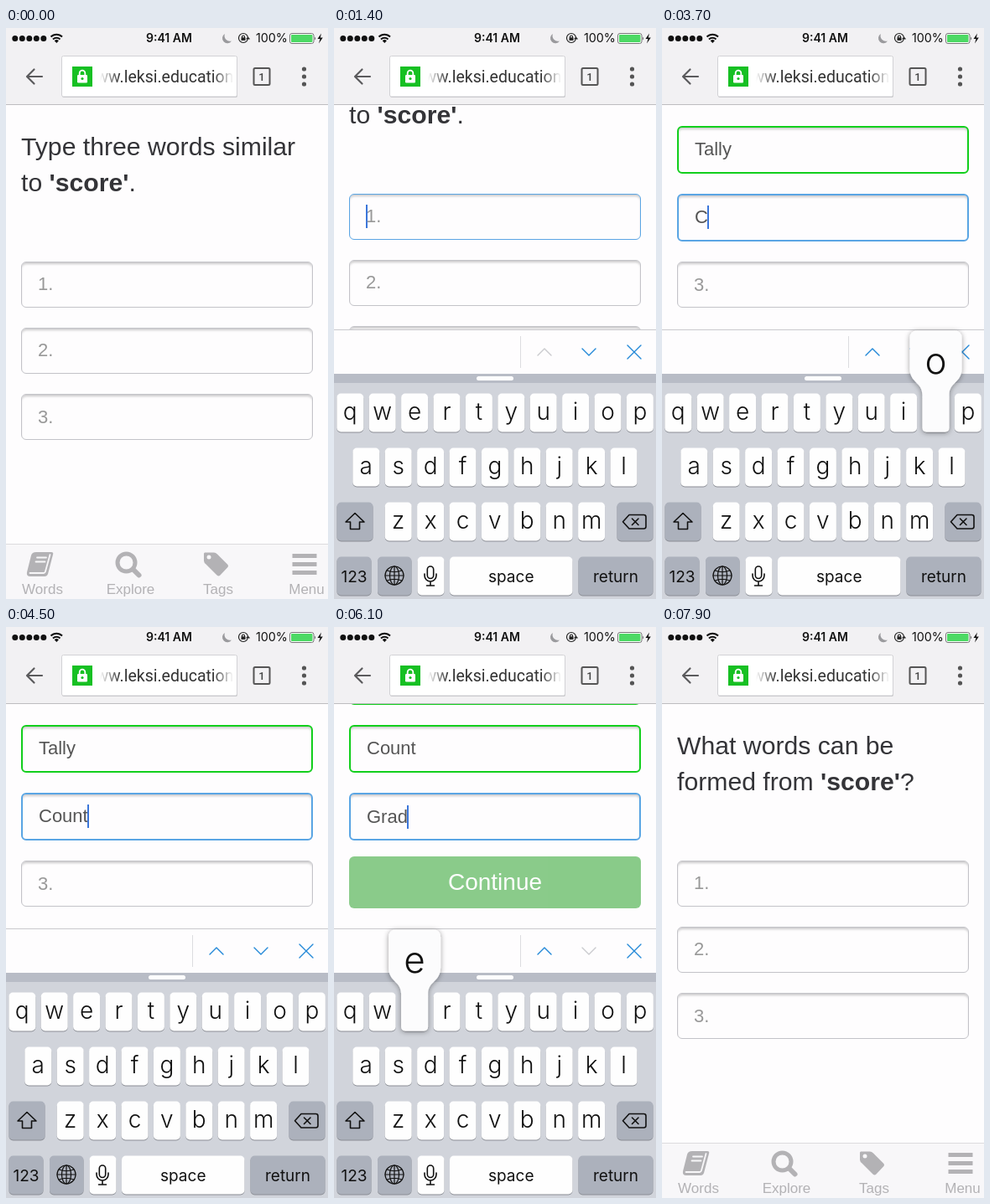
Write an HTML page that moves like this. It is 384 by 682 pixels and loops after 8 s.

```html
<!DOCTYPE html>
<html lang="en">
<head>
<meta charset="utf-8">
<title>Word quiz on a phone</title>
<style>
  html, body { margin: 0; width: 100%; height: 100%; overflow: hidden; background: #fefdfe; }
  body { position: relative; font-family: "Liberation Sans", Arial, sans-serif; }
  #page { position: absolute; left: 0; top: 0; width: 384px; }
  h1 { position: absolute; left: 18px; top: 120px; margin: 0; font: 400 30.2px/43px "Liberation Sans", Arial, sans-serif; color: #343438; white-space: nowrap; }
  #form { position: absolute; left: 18px; top: 278.6px; width: 348px; }
  .field { display: flex; align-items: center; box-sizing: content-box; height: 53px; margin-bottom: 24.4px;
    padding-left: 19px; border: 1px solid #c3c3c8; border-radius: 6px; font-size: 22px; color: #555;
    box-shadow: inset 0 3px 3px -1px rgba(0, 0, 0, .2); }
  .filled { border: 2px solid #12cf1c; }
  .focus { border-color: #5aa5e4; }
  .field i { width: 2px; height: 28px; margin-right: -2px; background: #3b76da; visibility: hidden; }
  .filled i { margin-left: -1px; }
  .focus i { visibility: visible; }
  .field em { font-style: normal; color: #999; }
  .filled em { display: none; }
  #go { margin-top: -5.5px; height: 62px; border-radius: 6px; background: #5cb85c; color: #fff; font-size: 28px; line-height: 62px; text-align: center; }
  svg { position: absolute; left: 0; top: 0; }
  .key { font: 300 28px Inter, sans-serif; }
  .ui { font: 400 19px Inter, sans-serif; }
  .status { font: 600 14px Inter, sans-serif; }
  .tab { font: 17px "Liberation Sans", Arial, sans-serif; fill: #b3b2b5; }
  .mid, .key, .ui, .tab { text-anchor: middle; }
  .line { fill: none; stroke-linecap: round; stroke-linejoin: round; }
</style>
</head>
<body>
<div id="page">
  <h1>Type three words similar<br>to <b>'score'</b>.</h1>
  <h1>What words can be<br>formed from <b>'score'</b>?</h1>
  <div id="form">
    <div class="field"><span></span><i></i><em>1.</em></div>
    <div class="field"><span></span><i></i><em>2.</em></div>
    <div class="field"><span></span><i></i><em>3.</em></div>
    <div id="go">Continue</div>
  </div>
</div>

<svg width="384" height="682" viewBox="0 0 384 682">
  <defs>
    <linearGradient id="fade"><stop stop-color="#fff"/><stop offset="1" stop-color="#fff" stop-opacity="0"/></linearGradient>
    <filter id="shade" x="-30%" y="-20%" width="160%" height="140%"><feDropShadow dx="0" dy="1" stdDeviation="3" flood-opacity=".4"/></filter>
  </defs>

  <!-- status bar and browser bar -->
  <rect width="384" height="92" fill="#f2f1f3"/>
  <path d="M0 91.5H384" stroke="#bdbdc0"/>
  <path d="M10.8 12.5H45" stroke="#111" stroke-width="7" stroke-linecap="round" stroke-dasharray="0 8.5"/>
  <path d="M53.5 10.5a9.5 9.5 0 0 1 13.5 0M56 13.5a6 6 0 0 1 8.5 0" fill="none" stroke="#111" stroke-width="2"/>
  <path d="M60.3 18l-2.6-2.8a3.8 3.8 0 0 1 5.2 0z" fill="#111"/>
  <text class="status mid" x="194.5" y="17" fill="#111">9:41 AM</text>
  <path d="M261 7a6 6 0 1 0 8 8.5a6.5 6.5 0 0 1-8-8.5z" fill="#9a9a9d"/>
  <g class="line" stroke="#222" stroke-width="1.2"><circle cx="283" cy="12" r="5.5"/><path d="M281.5 11.5v-1a1.5 1.5 0 0 1 3 0v1M287 13l1.6-1.5 1.5 1.5"/></g>
  <rect x="280.5" y="11.3" width="5" height="3.6" fill="#222"/>
  <text x="298" y="17" style="font:400 14.3px Inter,sans-serif" fill="#111">100%</text>
  <rect x="338.5" y="6.5" width="28.5" height="12" rx="2.5" fill="#fff" stroke="#555" stroke-width=".8"/>
  <rect x="340" y="8" width="25.5" height="9" rx="1" fill="#4cd964"/>
  <path d="M368.2 10.5q2 2 0 4z" fill="#555"/>
  <path d="M376 6.5l-4.5 6.5h3l-1.5 5.5 4.8-7h-3z" fill="#111"/>

  <path class="line" d="M43 58H25.5M33.5 49.5L25 58l8.5 8.5" stroke="#5b5b5d" stroke-width="2.2"/>
  <rect x="67" y="34" width="209" height="49" rx="2" fill="#c4c4c7"/>
  <rect x="66.5" y="33.5" width="209" height="48.5" rx="2" fill="#fff" stroke="#d2d2d5"/>
  <rect x="79" y="46" width="24" height="24" fill="#17c023"/>
  <rect x="85" y="56" width="12" height="9.5" rx="1.2" fill="#fff"/>
  <path class="line" d="M87.7 56v-2a3.3 3.3 0 0 1 6.6 0v2" stroke="#fff" stroke-width="1.8"/>
  <circle cx="91" cy="60.5" r="1.6" fill="#17c023"/>
  <svg x="112" y="40" width="159" height="36">
    <text x="159.5" y="25" text-anchor="end" style="font:19.5px Roboto,sans-serif" fill="#333">www.leksi.education</text>
    <rect width="24" height="36" fill="url(#fade)"/>
    <rect width="24" height="36" fill="url(#fade)" transform="matrix(-1 0 0 1 159 0)"/>
  </svg>
  <rect x="295.5" y="48" width="19" height="20" rx="1.5" fill="none" stroke="#555" stroke-width="2"/>
  <text class="mid" x="305" y="62.5" style="font:500 13px Roboto,sans-serif" fill="#444">1</text>
  <path d="M355.5 49V68" stroke="#555" stroke-width="5.2" stroke-linecap="round" stroke-dasharray="0 9"/>

  <!-- tab bar -->
  <rect y="616" width="384" height="66" fill="#f8f7f9"/>
  <path d="M0 616.5H384" stroke="#dcdbde"/>
  <g fill="#b3b2b5">
    <path d="M36 626h18q3 0 2 3l-6 23q-1 3-4 3H29q-5 0-4-5l5-20q1-4 6-4z"/>
    <path class="line" d="M37 632.5h11M35.5 637.5h11M28.5 651H45q1.500 0 2-2l5.500-20" stroke="#f8f7f9" stroke-width="1.8"/>
    <path d="M237 626.5h11q2 0 4 2l12 12q2 2 0 4l-8.5 9q-2 2-4 0l-13-13q-2.5-2-2.5-4v-9z"/>
    <circle cx="242" cy="632" r="2.5" fill="#f8f7f9"/>
    <path d="M341.5 628h29v5h-29zM341.5 638h29v5h-29zM341.5 648h29v5h-29z"/>
  </g>
  <g class="line" stroke="#b3b2b5"><circle cx="143.5" cy="638.5" r="10.5" stroke-width="5"/><path d="M152 647l6.500 6.500" stroke-width="6"/></g>
  <text class="tab" x="43.5" y="676">Words</text><text class="tab" x="148.5" y="676">Explore</text>
  <text class="tab" x="253" y="676">Tags</text><text class="tab" x="358.5" y="676">Menu</text>

  <!-- keyboard -->
  <g id="board">
    <rect y="360" width="384" height="54" fill="#fefdfe"/>
    <path d="M0 360.5H384" stroke="#c9c9cd"/>
    <path d="M222.5 368V406" stroke="#dcdce0"/>
    <g class="line" stroke-width="1.4">
      <path id="up" d="M243 391l8-8 8 8"/><path id="down" d="M296 383l8 8 8-8"/>
      <path d="M350 379l16 16M366 379l-16 16" stroke="#2489d8"/>
    </g>
    <rect y="413" width="384" height="269" fill="#d1d4db"/>
    <rect y="413" width="384" height="11" fill="#b8bcc6"/>
    <rect x="170" y="416" width="44" height="5" rx="2.5" fill="#fff"/>
    <g id="keys"></g>
    <g class="line" stroke="#111" stroke-width="1.6">
      <path d="M25 579.5l11 10.5h-5.5v8.5h-11V590H14z"/>
      <path d="M352 581.5h17.5q2.5 0 2.5 2.5v11.5q0 2.5-2.5 2.5H352l-7.5-8.3zM355.5 586l7.5 7.5M363 586l-7.5 7.5"/>
      <g stroke-width="1.2"><circle cx="72" cy="654" r="11"/><ellipse cx="72" cy="654" rx="5.5" ry="11"/><path d="M72 643v22M61 654h22M63.5 648q8.5 3.5 17 0M63.5 660q8.5-3.5 17 0"/></g>
      <rect x="111.3" y="643" width="7.4" height="14.5" rx="3.7"/><path d="M108 652v2a7 7 0 0 0 14 0v-2M115 661v5M110.5 666h9"/>
    </g>
    <g id="pop"><path fill="#fcfcfd" filter="url(#shade)" d="M-31-66q0-9 9-9H22q9 0 9 9V-30C31-12 16-14 16 2V41q0 5-5 5H-11q-5 0-5-5V2C-16-14-31-12-31-30z"/>
      <text class="mid" y="-24" style="font:300 44px Inter,sans-serif" fill="#111"></text></g>
  </g>
</svg>

<script>
const $ = id => document.getElementById(id);
const titles = document.querySelectorAll("h1");
const fields = [...document.querySelectorAll(".field")];
const popText = $("pop").querySelector("text");

// Keyboard
const keyAt = {};
let keys = "";
function addKey(x, y, w, label, cls, fill = "#fefefe") {
  const base = y + (cls === "key" ? 31 : 30);
  keys += `<rect x="${x}" y="${y + 1}" width="${w}" height="46" rx="5" fill="#8b8e95"/>` +
    `<rect x="${x}" y="${y}" width="${w}" height="46" rx="5" fill="${fill}"/>` +
    `<text class="${cls}" x="${x + w / 2}" y="${base}" fill="#111">${label}</text>`;
}
const rows = [["qwertyuiop", 19.3, 436.5], ["asdfghjkl", 38.3, 501.5], ["zxcvbnm", 76.7, 566.5]];
for (const [letters, x0, y] of rows)
  [...letters].forEach((ch, i) => {
    const x = x0 + i * 38.4;
    keyAt[ch] = [x, y];
    addKey(x - 16, y, 32, ch, "key");
  });
const grey = "#acb1bc";
addKey(3.5, 566.5, 43, "", "ui", grey);
addKey(337.5, 566.5, 43, "", "ui", grey);
addKey(3.5, 631.5, 41, "123", "ui", grey);
addKey(52, 631.5, 40.5, "", "ui", grey);
addKey(99.5, 631.5, 32, "", "ui");
addKey(138, 631.5, 146.5, "space", "ui");
addKey(291.5, 631.5, 89, "return", "ui", grey);
$("keys").innerHTML = keys;

// Each word with press and release times of its letters
const words = [
  ["Tally", [1500, 1600, 1700, 1800, 1900, 2000, 2100, 2200, 2300, 2500]],
  ["Count", [3500, 3600, 3700, 3900, 4000, 4100, 4200, 4300, 4400, 4500]],
  ["Grade", [5400, 5500, 5600, 5700, 5800, 5900, 6000, 6100, 6100, 6200]],
];
const LOOP = 8000, SWAP = 7000;
const ramp = (t, a, b) => Math.min(1, Math.max(0, (t - a) / (b - a)));
const ease = (t, a, b) => 1 - (1 - ramp(t, a, b)) ** 3;

function draw(t) {
  const focus = t < 800 || t >= 6700 ? -1 : t < 2950 ? 0 : t < 5050 ? 1 : 2;
  const fresh = t >= SWAP;
  let pressed = "";

  words.forEach(([word, times], i) => {
    let typed = 0;
    [...word].forEach((ch, k) => {
      if (t >= times[2 * k + 1]) typed++;
      else if (t >= times[2 * k]) pressed = ch.toLowerCase();
    });
    if (fresh) typed = 0;
    fields[i].firstChild.textContent = word.slice(0, typed);
    fields[i].classList.toggle("filled", typed > 0);
    fields[i].classList.toggle("focus", focus === i);
  });

  titles[0].hidden = fresh;
  titles[1].hidden = !fresh;
  $("go").style.opacity = fresh ? 0 : ramp(t, 5530, 6350);

  const scroll = 81 * (ease(t, 950, 1350) + ease(t, 2950, 3200) + ease(t, 5050, 5300)) * (1 - ease(t, 6750, 7250));
  $("page").style.transform = `translateY(${-Math.round(scroll)}px)`;
  const shown = ease(t, 780, 1300) - ease(t, 6680, 7200);
  $("board").setAttribute("transform", `translate(0 ${(1 - shown) * 322})`);

  const tint = on => on ? "#2489d8" : "#cbcbcf";
  $("up").setAttribute("stroke", tint(focus > 0 && !(t >= 5050 && t < 5590)));
  $("down").setAttribute("stroke", tint(focus < 2));

  $("pop").style.display = pressed ? "" : "none";
  if (pressed) {
    $("pop").setAttribute("transform", `translate(${keyAt[pressed]})`);
    popText.textContent = pressed;
  }
}

function tick() {
  draw((performance.now() + 15) % LOOP);
  requestAnimationFrame(tick);
}
tick();
</script>
</body>
</html>
```
